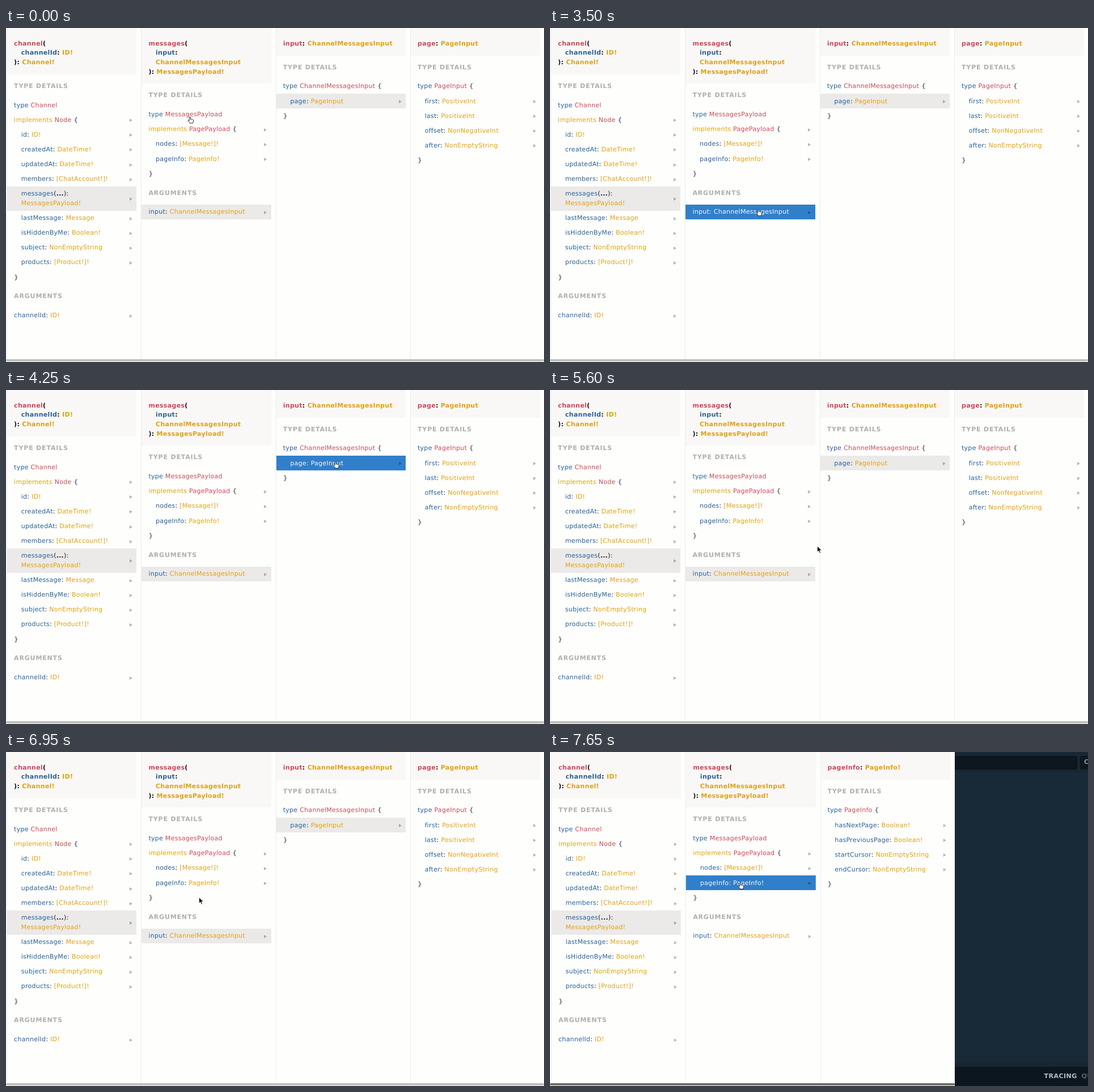
Animation, 949 px wide and 590 px high, one loop 8000 ms. Source, as an HTML page:

```html
<!DOCTYPE html>
<html lang="en">
<head>
<meta charset="utf-8">
<title>Schema docs</title>
<style>
  html, body { margin: 0; width: 100%; height: 100%; overflow: hidden; }
  body {
    position: relative; background: #182a38; color: #1c1c1c;
    font: 11.07px/16.6px "DejaVu Sans", sans-serif;
    letter-spacing: .24px; text-rendering: geometricPrecision; white-space: nowrap;
  }
  div, svg { position: absolute; box-sizing: border-box; }

  .topbar { left: 0; top: 0; width: 949px; height: 36px; background: #172733; }
  .url { left: 20px; top: 7px; width: 910px; height: 24px; border-radius: 3px; background: #0c171f; border: 1px solid #0a1219; }
  .copy { left: 935px; top: 7px; width: 80px; height: 24px; border-radius: 3px; background: #0c171f; padding: 3px 7px; color: #8b949a; font-weight: bold; }
  .strip { left: 0; top: 548px; width: 949px; height: 8px; background: #192631; }
  .footer { left: 0; top: 556px; width: 949px; height: 34px; background: #0b161e; font-weight: bold; letter-spacing: .42px; color: #b6bcc0; }
  .footer span { position: absolute; left: 871.5px; top: 9px; }
  .footer span + span { left: 937.5px; color: #58636a; }

  .panel { left: 0; top: 0; width: 949px; height: 590px; overflow: hidden; background: #fefefd; }
  .cols { left: 0; top: 0; width: 949px; height: 590px; }
  .col { top: 0; width: 229.3px; height: 584px; border-left: 1px solid #ebebea; }
  .col div { position: relative; }
  .title { padding: 19.9px 12px 12.1px; background: #f9f8f7; font-weight: bold; letter-spacing: .28px; color: #111; }
  .title p { margin: 0; }
  .title p.in { margin-left: 12.65px; }
  .head { margin: 13px 0 12.02px; padding-left: 12px; color: #afafae; font-weight: bold; letter-spacing: .79px; }
  .row { padding: 5.275px 12px 4.275px; }
  .row.in { padding-left: 24.65px; }
  .row.more::after {
    content: ""; position: absolute; left: 216px; top: 50%; margin-top: -2.4px;
    border: solid transparent; border-width: 3px 0 3px 5px; border-left-color: rgba(0, 0, 0, .28);
  }
  .on { background: #ebeae9; }
  .f { color: #29629a; }
  .t { color: #e2a114; }
  .r { color: #cd4957; }
  .g { color: #7d8188; font-weight: bold; }
  .bar { left: 0; top: 585px; width: 100%; height: 4px; border-radius: 2px; background: #bfbfbe; }
  .cursor { left: 0; top: 0; }
  .cursor svg { left: 0; top: 0; overflow: visible; }
</style>
</head>
<body>
<div class="topbar"><div class="url"></div><div class="copy">COPY CURL</div></div>
<div class="strip"></div>
<div class="footer"><span>TRACING</span><span>QUERY VARIABLES</span></div>

<div class="panel">
  <div class="cols"></div>
  <div class="bar"></div>
</div>

<div class="cursor">
  <svg id="hand" width="10" height="12"><path transform="translate(-3.6 -.3) scale(1.08 1)" fill="#fff" stroke="#151515" stroke-width=".85" stroke-linejoin="round"
    d="M2.7 7V1.4a1 1 0 0 1 2 0V4.6c.2-.7 1.6-.7 1.8.2.4-.5 1.5-.4 1.6.4.5-.3 1.3 0 1.3.8V8.3c0 1-.9 1.6-.9 3.1H3.6C3.4 10 1.6 8.6.7 7 .3 6.2 1.3 5.6 2 6.3Z"/></svg>
  <svg id="arrow" width="9" height="14"><path fill="#111" stroke="#fff" stroke-width=".8"
    d="M.4.8V11.4L2.9 9.1 4.6 13.3 6.5 12.5 4.8 8.5H8.4Z"/></svg>
</div>

<script>
const LOOP = 8000, STEP = 50;
const BLUE = '#307fcb', GRAY = '#ebeae9', CLEAR = 'rgba(48,127,203,0)';
const HOLD = 'steps(1, end)';
const $ = s => document.querySelector(s);

// ---- content ----
const s = (cls, text) => `<span class="${cls}">${text}</span>`;
const pair = (name, type, cls = 'f') => `${s(cls, name)}: ${s('t', type)}`;
const row = (html, cls = '', id = '') => `<div class="row ${cls}" id="${id}">${html}</div>`;
const field = (name, type, cls = '', id = '') => row(pair(name, type), 'in more ' + cls, id);
const head = text => `<div class="head">${text}</div>`;
const title = (...lines) => `<div class="title">${lines.map(l =>
  l[0] === '>' ? `<p class="in">${l.slice(1)}</p>` : `<p>${l}</p>`).join('')}</div>`;
const typeRow = (name, open) => row(`${s('f', 'type')} ${s('r', name)}${open ? ' ' + s('g', '{') : ''}`);
const implRow = name => row(`${s('t', 'implements')} ${s('r', name)} ${s('g', '{')}`, 'more');
const close = row(s('g', '}'));
const details = head('TYPE DETAILS'), args = head('ARGUMENTS');
const col = (i, id, ...parts) =>
  `<div class="col" id="${id}" style="left:${1.1 + 237.3 * i}px">${parts.join('')}</div>`;

$('.cols').innerHTML = [
  col(0, 'channel',
    title(s('r', 'channel') + '(', '>' + pair('channelId', 'ID!'), '): ' + s('t', 'Channel!')),
    details, typeRow('Channel'), implRow('Node'),
    field('id', 'ID!'), field('createdAt', 'DateTime!'), field('updatedAt', 'DateTime!'),
    field('members', '[ChatAccount!]!'),
    row(`${s('f', 'messages')}(<b>...</b>):<br>${s('t', 'MessagesPayload!')}`, 'in more on'),
    field('lastMessage', 'Message'), field('isHiddenByMe', 'Boolean!'),
    field('subject', 'NonEmptyString'), field('products', '[Product!]!'),
    close, args, row(pair('channelId', 'ID!'), 'more')),
  col(1, 'messages',
    title(s('r', 'messages') + '(', '>' + s('f', 'input') + ':', '>' + s('t', 'ChannelMessagesInput'),
      '): ' + s('t', 'MessagesPayload!')),
    details, typeRow('MessagesPayload'), implRow('PagePayload'),
    field('nodes', '[Message!]!'), field('pageInfo', 'PageInfo!', '', 'infoRow'),
    close, args, row(pair('input', 'ChannelMessagesInput'), 'more', 'inputRow')),
  col(2, 'input',
    title(pair('input', 'ChannelMessagesInput', 'r')),
    details, typeRow('ChannelMessagesInput', true), field('page', 'PageInput', '', 'pageRow'), close),
  col(3, 'page',
    title(pair('page', 'PageInput', 'r')),
    details, typeRow('PageInput', true),
    field('first', 'PositiveInt'), field('last', 'PositiveInt'),
    field('offset', 'NonNegativeInt'), field('after', 'NonEmptyString'), close),
  col(2, 'info',
    title(pair('pageInfo', 'PageInfo!', 'r')),
    details, typeRow('PageInfo', true),
    field('hasNextPage', 'Boolean!'), field('hasPreviousPage', 'Boolean!'),
    field('startCursor', 'NonEmptyString'), field('endCursor', 'NonEmptyString'), close)
].join('');

// ---- motion ----
// points: [time, value, easing to the next point]
function track(el, prop, points) {
  const last = points[points.length - 1];
  const frames = [...points, [LOOP, last[1]]].map(([t, v, easing = HOLD]) =>
    ({ offset: t / LOOP, [prop]: v, easing }));
  el.animate(frames, { duration: LOOP, iterations: Infinity });
}

function hover(el, base, spans, extra = []) {
  const bg = [[0, base]];
  for (const [from, to] of spans) {
    bg.push([from, base, 'linear'], [from + 100, BLUE]);
    if (to < LOOP) bg.push([to, BLUE, 'linear'], [to + 100, base]);
  }
  track(el, 'backgroundColor', [...bg, ...extra]);
  for (const part of [el, ...el.querySelectorAll('span')]) {
    const own = getComputedStyle(part).color;
    const points = [[0, own]];
    for (const [from, to] of spans) {
      points.push([from, '#f4f8fc']);
      if (to < LOOP) points.push([to, own]);
    }
    track(part, 'color', points);
  }
}

hover($('#inputRow'), GRAY, [[600, 3550], [6100, 6750]], [[7550, CLEAR]]);
hover($('#pageRow'), GRAY, [[4150, 5000]]);
hover($('#infoRow'), CLEAR, [[7200, LOOP]]);

// moves: [first step, last step, x, y] of the pointer tip
const moves = [
  [200, 200, 350, 370], [350, 350, 350, 369],
  [500, 600, 347, 330], [650, 700, 345, 324.5],
  [3500, 3500, 367, 320.5], [3550, 3600, 420, 300], [3650, 3700, 492, 255],
  [3750, 3800, 532, 185], [3850, 3850, 548, 150], [3900, 3900, 568, 114], [3950, 4000, 576, 111],
  [4150, 4250, 580.5, 127], [4350, 4350, 580, 129], [4500, 4500, 592.5, 131],
  [4650, 4650, 609, 133], [4700, 4700, 630, 136],
  [5000, 5250, 522, 223], [5400, 5400, 487, 244], [5600, 5600, 471, 275],
  [5800, 5900, 469, 340], [5950, 6000, 430, 343], [6050, 6300, 392.5, 325.5],
  [6700, 6950, 340, 256], [7100, 7300, 335, 231]
];
const at = (x, y) => `translate(${x}px, ${y}px)`;
let here = at(324, 157);
const path = [[0, here]];
for (const [from, to, x, y] of moves) {
  const steps = (to - from) / STEP + 1;
  path.push([from - STEP, here, `steps(${steps}, end)`]);
  here = at(x, y);
  path.push([to, here]);
}
track($('.cursor'), 'transform', path);

const hand = [[0, 1], [50, 0], [600, 1], [3550, 0], [4150, 1], [5000, 0], [6100, 1], [6750, 0], [7200, 1]];
track($('#hand'), 'opacity', hand);
track($('#arrow'), 'opacity', hand.map(([t, v]) => [t, 1 - v]));

// the click swaps the columns, then the panel narrows
track($('#input'), 'opacity', [[0, 1], [7550, 0]]);
track($('#page'), 'opacity', [[0, 1], [7550, 0]]);
track($('#info'), 'opacity', [[0, 0], [7550, 1]]);
track($('.bar'), 'backgroundColor', [[0, '#bfbfbe'], [7450, '#6e6e6d']]);
track($('.panel'), 'width', [[0, '949px'], [7600, '714.3px']]);
track($('.cols'), 'transform', [[0, at(0, 0)], [7600, at(.8, 0)]]);
</script>
</body>
</html>
```
